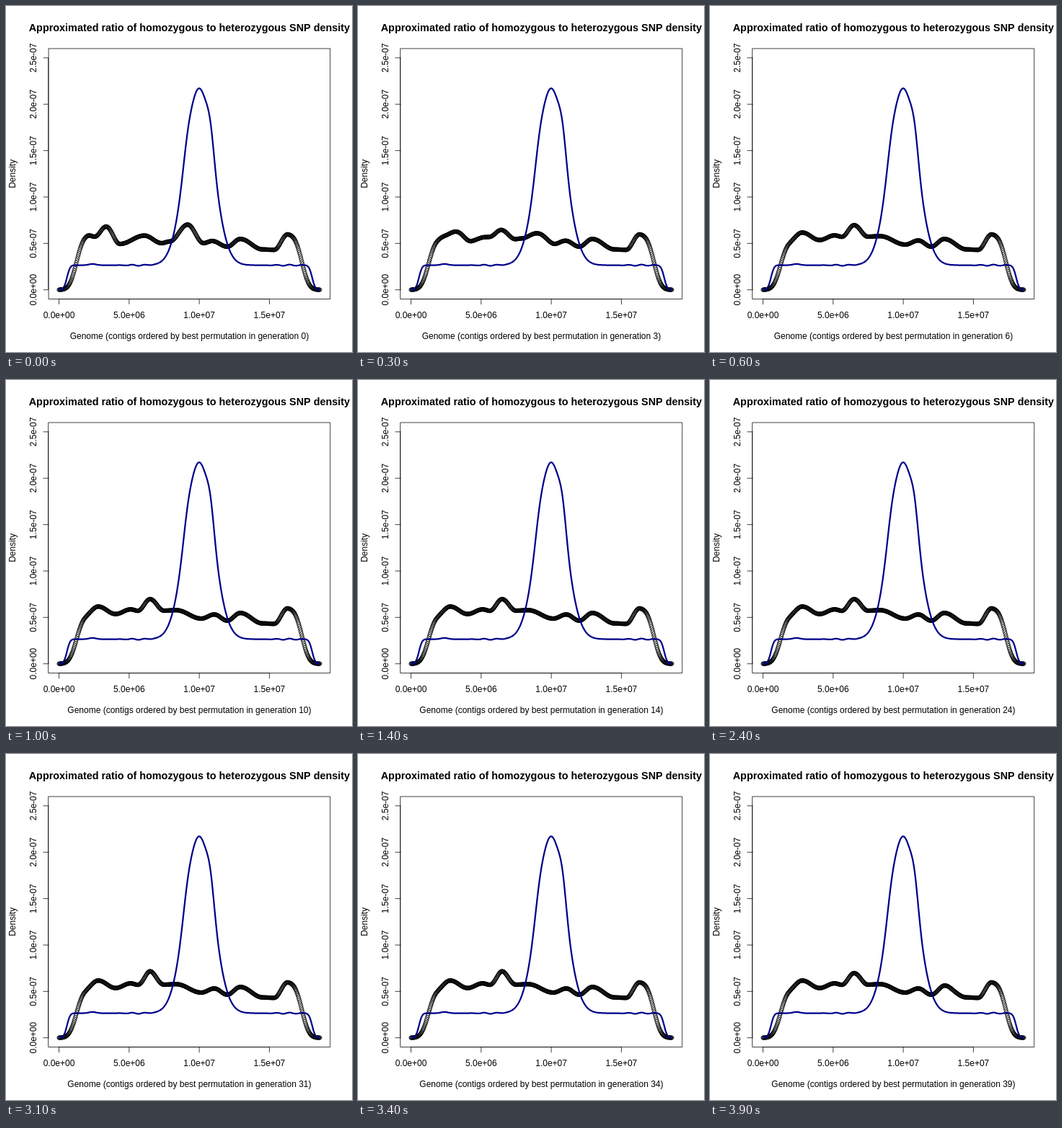
Recreate the animation shown at these times as an HTML page with a canvas. Size 480 by 480 pixels, loop 4 s.

```html
<!DOCTYPE html>
<html>
<head>
<meta charset="utf-8">
<style>
html, body { margin: 0; width: 100%; height: 100%; overflow: hidden; background: #fff; }
canvas { display: block; }
</style>
</head>
<body>
<canvas id="plot" width="480" height="480"></canvas>
<script>
const ctx = document.getElementById('plot').getContext('2d');
const FONT = '"Liberation Sans", Arial, sans-serif';
const LEFT = 59.04, RIGHT = 449.76, TOP = 59.04, BOTTOM = 406.56;
const X0 = 73.5, X1 = 435.3, Y0 = 393.69;
const X_STEP = 97.3, Y_STEP = 64.36;
const MID_X = (LEFT + RIGHT) / 2, MID_Y = (TOP + BOTTOM) / 2;
const POINTS = 512;

// Turning points as [x, height above zero]
const tail = [[307, 59.8], [325, 70.5], [356, 56], [372, 55.4], [391, 77.3], [440, 77.3]];
const early = [[70, 77], [113, 76.7], [123, 73.7], [139, 87.7], [158, 63.6], [192, 75.2],
  [216, 64.7], [227, 67], [252, 90.4], [274, 64.7], [286, 67.7], ...tail];
const late = [[70, 68], [109, 68], [128, 79.4], [152, 69], [173, 75.5], [183, 73.5],
  [200, 89.7], [219, 73.7], [236, 74.4], [271, 62.7], [289, 68.4], ...tail];

// Cosine ease from one turning point to the next
function wave(knots, x) {
  const i = knots.findIndex(k => k[0] > x);
  const [xa, ha] = knots[i - 1], [xb, hb] = knots[i];
  return ha + (hb - ha) * (1 - Math.cos(Math.PI * (x - xa) / (xb - xa))) / 2;
}

const bell = (x, mid, sd) => Math.exp(-(((x - mid) / sd) ** 2) / 2);
// Close approximation of the normal distribution function
const normal = z => (1 + Math.tanh(0.798 * (z + 0.0447 * z ** 3))) / 2;
const edges = (x, from, to, sd) => normal((x - from) / sd) * normal((to - x) / sd);

function ratioHeight(x, gen) {
  const blend = Math.min(1, gen / 5);
  let h = wave(early, x) * (1 - blend) + wave(late, x) * blend;
  if (gen >= 25 && gen < 35) h += 2.5 * bell(x, 200, 5);
  if (gen >= 35) h += 2 * bell(x, 327, 6);
  return h * edges(x, 97.8, 410.5, 7.8);
}

function peakHeight(x) {
  const ripple = 0.9 * Math.sin((x - 115.5) / 2.9) * (bell(x, 183, 13) + bell(x, 391, 15))
    + 1.7 * bell(x, 120, 5);
  return (34.1 + ripple) * edges(x, 84.6, 424.7, 3.5)
    + 245 * bell(x, 268, 19) + 24 * bell(x, 284, 5) + 14 * bell(x, 251, 6);
}

function eachPoint(height, visit) {
  for (let i = 0; i < POINTS; i++) {
    const x = X0 + (X1 - X0) * i / (POINTS - 1);
    visit(x, Y0 - height(x));
  }
}

function text(str, x, y, font = '12px ', angle = 0) {
  ctx.save();
  ctx.translate(x, y);
  ctx.rotate(angle);
  ctx.font = font + FONT;
  ctx.fillText(str, 0, 0);
  ctx.restore();
}

const sideText = (str, x, y) => text(str, x, y, '12px ', -Math.PI / 2);

function line(x1, y1, x2, y2) {
  ctx.beginPath();
  ctx.moveTo(x1, y1);
  ctx.lineTo(x2, y2);
  ctx.stroke();
}

function drawAxes(gen) {
  ctx.strokeRect(LEFT, TOP, RIGHT - LEFT, BOTTOM - TOP);
  line(X0, BOTTOM, X0 + 3 * X_STEP, BOTTOM);
  line(LEFT - 0.3, Y0, LEFT - 0.3, Y0 - 5 * Y_STEP);
  for (let i = 0; i < 4; i++) {
    const x = X0 + i * X_STEP;
    line(x, BOTTOM, x, BOTTOM + 7.2);
    text(['0.0e+00', '5.0e+06', '1.0e+07', '1.5e+07'][i], x, 433);
  }
  for (let i = 0; i < 6; i++) {
    const y = Y0 - i * Y_STEP;
    line(LEFT - 7.2, y, LEFT, y);
    sideText(i ? (i / 2).toFixed(1) + (i < 2 ? 'e-07' : 'e-07') : '0.0e+00', 42, y);
  }
  text('Approximated ratio of homozygous to heterozygous SNP density', MID_X, 35, 'bold 14.4px ');
  text(`Genome (contigs ordered by best permutation in generation ${gen})`, MID_X, 462);
  sideText('Density', 13, MID_Y);
}

function draw(gen) {
  ctx.fillStyle = '#fff';
  ctx.fillRect(0, 0, 480, 480);
  ctx.fillStyle = ctx.strokeStyle = '#000';
  ctx.lineWidth = 0.75;
  ctx.textAlign = 'center';
  drawAxes(gen);

  eachPoint(x => ratioHeight(x, gen), (x, y) => {
    ctx.beginPath();
    ctx.arc(x, y, 2.7, 0, 2 * Math.PI);
    ctx.stroke();
  });

  ctx.strokeStyle = '#00008b';
  ctx.lineWidth = 2.25;
  ctx.lineJoin = ctx.lineCap = 'round';
  ctx.beginPath();
  eachPoint(peakHeight, (x, y) => ctx.lineTo(x, y));
  ctx.stroke();
}

let shown = -1;
function tick() {
  const gen = Math.floor(performance.now() % 4000 / 100);
  if (gen !== shown) draw(shown = gen);
  requestAnimationFrame(tick);
}
tick();
</script>
</body>
</html>
```
